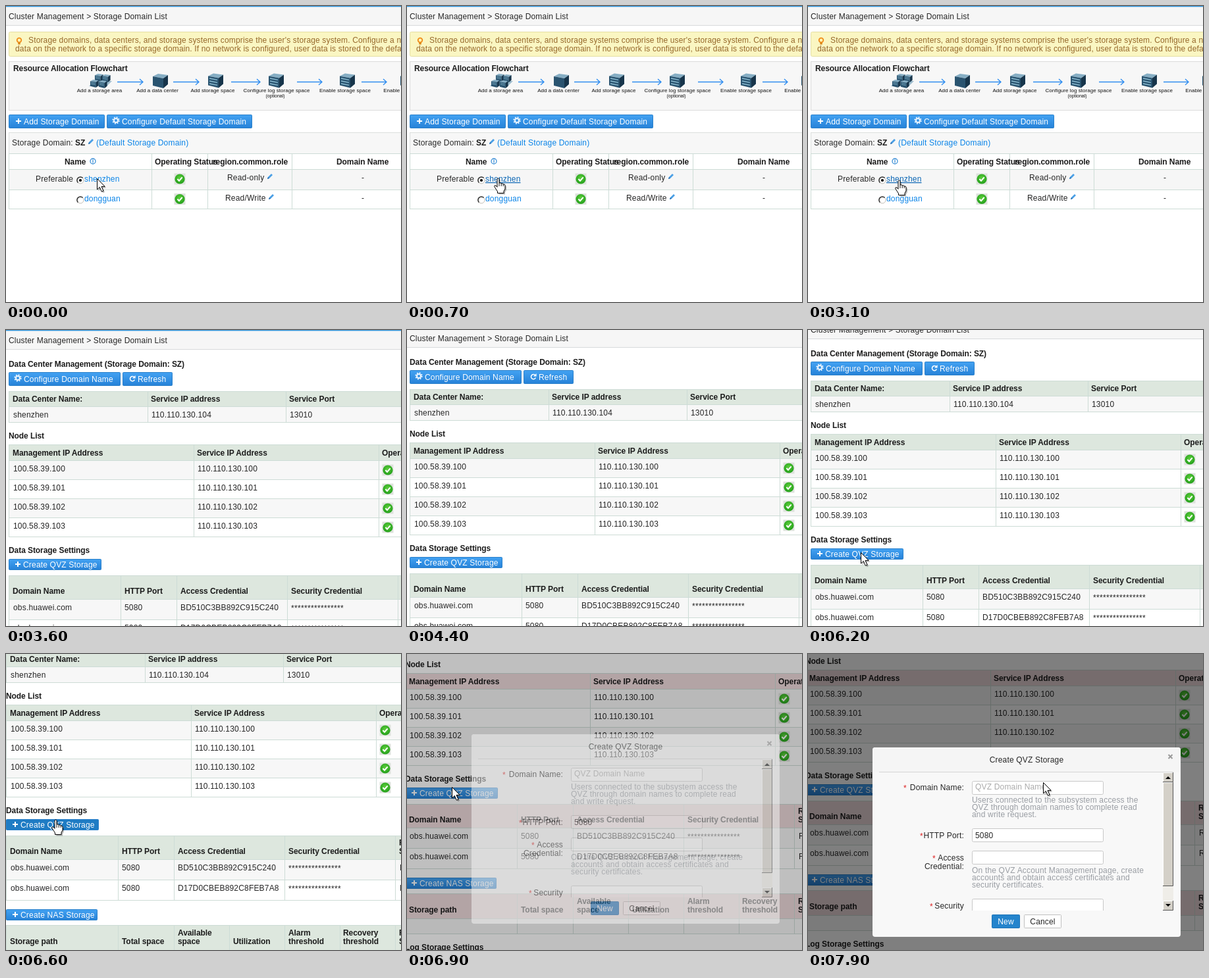
Animation, 600 px wide and 450 px high, one loop 8000 ms. Source, as an HTML page:

```html
<!DOCTYPE html>
<html lang="en">
<head>
<meta charset="utf-8">
<title>Storage domain walkthrough</title>
<style>
html, body { margin: 0; width: 100%; height: 100%; overflow: hidden; background: #fff; }
svg { display: block; width: 600px; height: 450px; }
text { font: 12px "Liberation Sans", Arial, sans-serif; letter-spacing: .18px; fill: #262626; white-space: pre; }
.b { font-weight: bold; letter-spacing: -.07px; fill: #1c1c1c; }
.w { fill: #fff; }
.link { fill: #0a84e8; }
.note { fill: #96682a; letter-spacing: .15px; }
.tiny { font-size: 8px; letter-spacing: .03px; text-anchor: middle; fill: #111; }
.mini { font-size: 7px; letter-spacing: 0; text-anchor: middle; fill: #111; }
.secret { letter-spacing: .33px; }
.r { text-anchor: end; }
.m { text-anchor: middle; }
.help { fill: #999da3; }
.hint { fill: #aaa; }
.star { fill: #d22; }
.head { fill: #dde7de; }
.dimmed .head { fill: #eedadc; }
.hover { fill: #0b66b5; text-decoration: underline; }
</style>
</head>
<body>
<svg id="stage" viewBox="0 0 600 450"></svg>
<script>
const LOOP = 8000, STEP = 100, RIGHT = 630;
const LINE = '#cddcd6';

const text = (x, y, s, cls = '', id = '') =>
  `<text x="${x}" y="${y}" class="${cls}"${id && ` id="${id}"`}>${s}</text>`;
const rect = (x, y, w, h, fill, more = '') =>
  `<rect x="${x}" y="${y}" width="${w}" height="${h}" fill="${fill}" ${more}/>`;
const path = (d, fill, more = '') => `<path d="${d}" fill="${fill}" ${more}/>`;
const at = (x, y, s) => `<g transform="translate(${x} ${y})">${s}</g>`;
const box = (x, y, w, h, fill, line, r = 0, id = '') =>
  rect(x + .5, y + .5, w - 1, h - 1, fill, `stroke="${line}" rx="${r}"${id && ` id="${id}"`}`);

const plus = (x, y) => path(`M${x - 4} ${y}h8M${x} ${y - 4}v8`, 'none', 'stroke="#fff" stroke-width="2"');
const gear = (x, y) =>
  `<circle cx="${x}" cy="${y}" r="3" fill="none" stroke="#e8f4ff" stroke-width="2"/>
   <circle cx="${x}" cy="${y}" r="4.7" fill="none" stroke="#e8f4ff" stroke-width="2" stroke-dasharray="1.85"/>`;
const reload = (x, y) =>
  path(`M${x + 3} ${y - 2}A3.6 3.6 0 1 0 ${x + 3.4} ${y + 1.5}`, 'none', 'stroke="#fff" stroke-width="1.6"') +
  path(`M${x + 4.6} ${y - 5}v4.6h-4.6z`, '#fff');
const pencil = (x, y) => at(x, y,
  path('M-4 4l1-3 5-5 2 2-5 5z', '#4a9fe6') + path('M-4 4l1-3 2 2z', '#2b6cab'));
const check = (x, y) => at(x, y,
  rect(-8.5, -8.5, 17, 17, '#dde2dc') + '<circle r="7.6" fill="url(#green)"/>' +
  path('M-3.6 0l2.6 2.7L3.7-2.6', 'none', 'stroke="#fff" stroke-width="2"'));
const radio = (x, y, on) =>
  `<circle cx="${x}" cy="${y}" r="5" fill="#fff" stroke="#c4c0b8"/>` +
  path(`M${x - 3.6} ${y + 3.6}A5 5 0 0 1 ${x + 3.6} ${y - 3.6}`, 'none', 'stroke="#333" stroke-width="1.5"') +
  (on ? `<circle cx="${x}" cy="${y}" r="2.1" fill="#000"/>` : '');
const button = (x, y, w, h, tx, ty, label, icon, id = '') =>
  box(x, y, w, h, 'url(#blue)', '#2a80ca', 1, id) + icon + text(tx, ty, label, 'w');

// rows holds the y of every rule: table top, header bottom, then each row bottom
function table(cols, rows) {
  const last = rows[rows.length - 1];
  let s = rect(4, rows[0], RIGHT, rows[1] - rows[0], 'none', 'class="head"');
  for (let i = 1; i < rows.length - 1; i++)
    s += rect(4, rows[i], RIGHT, rows[i + 1] - rows[i], i % 2 ? '#f7f7f7' : '#fff');
  const rules = rows.map(y => `M4 ${y + .5}h${RIGHT}`).join('');
  const bars = cols.map(x => `M${x + .5} ${rows[0]}V${last}`).join('');
  return s + path(rules + bars + `M4.5 ${rows[0]}V${last}`, 'none', `stroke="${LINE}"`);
}

const header = () =>
  rect(0, 0, RIGHT, 30, '#f6f6f6') + rect(0, 0, RIGHT, 1.3, '#2b93dc') +
  rect(0, 29, RIGHT, 1, '#d8dadc') + text(4, 20, 'Cluster Management &gt; Storage Domain List');

// an isometric cabinet with a bright lid and slots on its front
function cabinet(x, y, scale = 1, slots = 3) {
  let s = path('M-11-7L-3-11 12-9 5-4z', '#86aec4') +
    path('M-11-7L5-4V11L-11 7z', '#2a5470') + path('M5-4L12-9V5L5 11z', '#17354b');
  for (let i = 0; i < slots; i++)
    s += path(`M-9 ${i * 4 - 3.5}l12 2.4`, 'none', 'stroke="#8fc0d6" stroke-width="1.3"');
  return `<g transform="translate(${x} ${y}) scale(${scale})">${s}</g>`;
}
const cluster = (x, y) => at(x, y,
  path('M-17 8L-9 0H18L10 8z', '#9dbccd') +
  cabinet(-2, -5, .55, 2) + cabinet(9, -4, .55, 2) + cabinet(-9, 4, .55, 2) + cabinet(4, 5, .55, 2));

function flowchart() {
  const nodes = [[142, 'Add a storage area'], [230, 'Add a data center'], [314, 'Add storage space'],
    [411, 'Configure log storage space'], [515, 'Enable storage space'], [603, 'Enable a service']];
  const arrows = [[169, 208], [254, 293], [342, 386], [442, 480], [540, 578]];
  return cluster(143, 114) + cabinet(234, 114, 1, 0) +
    [318, 410, 518, 610].map(x => cabinet(x, 113.5)).join('') +
    nodes.map(([x, label]) => text(x, 131, label, 'tiny')).join('') +
    text(409, 139, '(optional)', 'mini') +
    arrows.map(([a, b]) => path(`M${a} 115.5H${b}M${b - 5} 111l5 4.5-5 4.5`, 'none',
      'stroke="#2f8df0" stroke-width="1.3"')).join('');
}

const listPage = () => header() +
  box(4, 39, RIGHT, 38, '#faf6c2', '#e5dfa4', 2) +
  '<circle cx="20" cy="52" r="3.3" fill="#fff3b0" stroke="#f08c1a" stroke-width="1.8"/>' +
  rect(18.3, 55.5, 3.4, 3, '#d98516') +
  text(34, 56, 'Storage domains, data centers, and storage systems comprise the user\'s storage system. Configure a network', 'note') +
  text(14, 69, 'data on the network to a specific storage domain. If no network is configured, user data is stored to the default', 'note') +
  box(4, 84, RIGHT, 75, '#f7f7f7', '#dcdcdc') +
  text(11, 99, 'Resource Allocation Flowchart', 'b') + flowchart() +
  button(4, 165, 146, 21, 27, 180, 'Add Storage Domain', plus(19, 175)) +
  button(153, 165, 221, 21, 176, 180, 'Configure Default Storage Domain', gear(167, 174)) +
  box(4, 192, RIGHT, 33, '#f7f7f7', '#dcdfdd') +
  text(9, 212, 'Storage Domain:') + text(105, 212, 'SZ', 'b') + pencil(129, 206) +
  text(137, 212, '(Default Storage Domain)', 'link') +
  rect(4, 225, RIGHT, 23, '#fff') + rect(4, 249, RIGHT, 30, '#f6f6f6') +
  path([224, 248, 279, 308].map(y => `M4 ${y + .5}h${RIGHT}`).join('') +
    [4, 221, 306, 434].map(x => `M${x + .5} 224V308`).join(''), 'none', `stroke="${LINE}"`) +
  text(89, 241, 'Name', 'b') + text(226, 241, 'Operating Status', 'b') +
  text(314, 241, 'region.common.role', 'b') + text(502, 241, 'Domain Name', 'b') +
  '<circle cx="132" cy="236" r="4" fill="none" stroke="#3b8fd6" stroke-width="1.3"/>' +
  rect(131.4, 233.5, 1.3, 5, '#3b8fd6') +
  text(45, 267, 'Preferable') + radio(113, 265, true) + text(119, 267, 'shenzhen', 'link', 'siteLink') +
  check(264, 263) + text(336, 265, 'Read-only') + pencil(401, 259) + text(540, 265, '-') +
  radio(113, 295) + text(119, 297, 'dongguan', 'link') +
  check(264, 293.5) + text(333, 296, 'Read/Write') + pencil(403, 290) + text(540, 296, '-');

function detailPage() {
  const row = (xs, y, cells, cls) => cells.map((c, i) => text(xs[i], y, c, cls)).join('');
  const nodes = [0, 1, 2, 3].map(i =>
    row([11, 291], 215 + 29 * i, [`100.58.39.10${i}`, `110.110.130.10${i}`]) + check(580, 213 + 29 * i)).join('');
  const stores = ['BD510C3BB892C915C240', 'D17D0CBEB892C8FEB7A8'].map((key, i) =>
    row([11, 180, 265, 602], 426 + 31 * i, ['obs.huawei.com', '5080', key, 'Read']) +
    text(433, 427 + 31 * i, '*'.repeat(16), 'secret')).join('');
  return header() +
    text(4, 56, 'Data Center Management (Storage Domain: SZ)', 'b') +
    button(4, 64, 170, 21, 27, 79, 'Configure Domain Name', gear(18, 73)) +
    button(177, 64, 76, 21, 200, 79, 'Refresh', reload(192, 74)) +
    table([215, 425], [93, 116, 140]) +
    row([10, 220, 430], 109, ['Data Center Name:', 'Service IP address', 'Service Port'], 'b') +
    row([11, 221, 431], 133, ['shenzhen', '110.110.130.104', '13010']) +
    text(4, 165, 'Node List', 'b') +
    table([285, 566], [174, 198, 227, 256, 285, 314]) +
    row([10, 290, 571], 191, ['Management IP Address', 'Service IP Address', 'Operating Status'], 'b') + nodes +
    text(4, 339, 'Data Storage Settings', 'b') +
    button(4, 348, 141, 17, 26, 361, 'Create QVZ Storage', plus(18, 356), 'create') +
    table([174, 259, 427, 595], [373, 409, 440, 471]) +
    row([10, 180, 265, 433, 601], 401,
      ['Domain Name', 'HTTP Port', 'Access Credential', 'Security Credential', 'Status'], 'b') +
    text(601, 388, 'Region', 'b') + stores +
    button(4, 485, 139, 17, 26, 498, 'Create NAS Storage', plus(18, 493)) +
    table([174, 259, 343, 427, 511, 595], [509, 547, 570]) +
    row([265, 433, 516, 601], 525, ['Available', 'Alarm', 'Recovery', 'Region'], 'b') +
    row([10, 180, 265, 349, 433, 516, 601], 538,
      ['Storage path', 'Total space', 'space', 'Utilization', 'threshold', 'threshold', 'Status'], 'b') +
    text(4, 595, 'Log Storage Settings', 'b');
}

function dialog() {
  const field = y => box(249, y, 200, 21, '#fff', '#c8c8c8', 2);
  const label = (y, s, starX) => text(237, y, s, 'r') + (starX ? text(starX, y + 1, '*', 'star') : '');
  const help = (y, lines) => lines.map((s, i) => text(249, y + 11 * i, s, 'help')).join('');
  const knob = (y, h, d) => rect(539, y, 16, h, '#d4d0c8') +
    path(`M539.5 ${y + h}V${y + .5}H555`, 'none', 'stroke="#fff"') +
    path(`M539 ${y + h - .5}H554.5V${y}`, 'none', 'stroke="#555"') + (d ? path(d, '#000') : '');
  return rect(98, 142, 468, 288, '#f8f8f8', 'rx="4"') +
    path('M98 180V146a4 4 0 0 1 4-4H562a4 4 0 0 1 4 4V180z', '#f5f5f5') +
    rect(108, 179, 447, 1, '#d5d5d5') +
    text(332, 165, 'Create QVZ Storage', 'm') +
    path('M547.5 153l6 6m0-6l-6 6', 'none', 'stroke="#999" stroke-width="2"') +
    '<g clip-path="url(#form)">' +
    field(193) + text(254, 206, 'QVZ Domain Name', 'hint') + label(207, 'Domain Name:', 145) +
    help(226, ['Users connected to the subsystem access the',
      'QVZ through domain names to complete read', 'and write request.']) +
    field(265) + text(254, 280, '5080') + label(280, 'HTTP Port:', 170) +
    field(299) + label(314, 'Access', 189) + label(327, 'Credential:') +
    help(333, ['On the QVZ Account Management page, create',
      'accounts and obtain access certificates and', 'security certificates.']) +
    field(372) + label(387, 'Security', 185) + '</g>' +
    rect(539, 180, 16, 210, '#efede8') +
    knob(180, 15, 'M543 190h8l-4-4z') + knob(195, 158) + knob(375, 15, 'M543 380h8l-4 4z') +
    box(279, 396, 43, 21, '#2484cc', '#1c74b8', 1) + text(300.5, 411, 'New', 'm w') +
    box(328, 396, 57, 21, '#fff', '#c0c0c0', 1) + text(356.5, 411, 'Cancel', 'm');
}

const arrowPath = 'M.5 .5V17L4.3 13.4 7.3 20.3 10 19.1 7 12.4H12.2z';
const handPath = 'M-2 1.5Q-2 0 -.5 0T1 1.5V7Q3.5 6 4.2 8 6.6 7 7.2 9 9.8 8.3 10 11V16L8 19.5V22.5H-1.5V20L-6.3 12.5Q-6.4 10 -4 11L-2 13.3z';
const cursor = (id, d, extra = '') => `<g id="${id}">` +
  path(d, '#000', 'opacity=".28" transform="translate(2 2)"') +
  path(d, '#fff', 'stroke="#000" stroke-linejoin="round"') + extra + '</g>';
const handLines = path('M1 7v5M4.2 8v4M7.2 9v3', 'none', 'stroke="#000" stroke-width=".9"');
const glass = `<g id="glass">${path('M14 13h9v2l-3.5 5 3.5 5v2h-9v-2l3.5-5-3.5-5z', '#fff', 'stroke="#000"')}${
  path('M16 25l2.5-3 2.5 3z', '#555')}</g>`;

document.getElementById('stage').innerHTML = `
  <defs>
    <linearGradient id="blue" x2="0" y2="1"><stop stop-color="#43a2f2"/><stop offset="1" stop-color="#2682d8"/></linearGradient>
    <radialGradient id="green" cy=".4"><stop stop-color="#5fd03c"/><stop offset="1" stop-color="#2aa51f"/></radialGradient>
    <clipPath id="form"><rect x="98" y="180" width="441" height="210"/></clipPath>
  </defs>
  ${rect(0, 0, 600, 450, '#fff')}
  <g id="list">${listPage()}</g><g id="detail">${detailPage()}</g>
  <rect id="shade" width="600" height="450"/><g id="dialog">${dialog()}</g>
  ${cursor('arrow', arrowPath, glass)}${cursor('hand', handPath, handLines)}`;

const part = Object.fromEntries(
  ['list', 'detail', 'shade', 'dialog', 'arrow', 'hand', 'glass', 'siteLink', 'create']
    .map(id => [id, document.getElementById(id)]));

// [time, x, y]
const pan = [[4100, 0, 0], [4800, 0, -8], [5800, 0, -8], [6200, 0, -16], [6600, -4, -97],
  [6700, -5, -117], [6800, -6, -134], [6900, -7, -145], [7000, -8, -150]];
const fade = [[6700, 0, -40], [7100, 1, 0]];
// [time, shape, x, y]
const pointer = [[0, 'arrow', 138, 262], [700, 'hand', 139, 262], [3100, 'hand', 139, 265],
  [3200, 'hand', 140, 269], [3300, 'arrow', 141, 274], [3500, ''],
  [6000, 'arrow', 150, 400], [6100, 'arrow', 100, 355], [6200, 'arrow', 80, 338],
  [6300, 'hand', 79, 316], [6400, 'hand', 78, 295], [6500, 'hand', 77, 273], [6600, 'hand', 76, 252],
  [6700, 'hand', 75, 232], [6800, 'arrow', 71, 214], [6900, 'arrow', 68, 202], [7000, 'arrow', 65, 195],
  [7800, 'arrow', 230, 198], [7900, 'arrow', 357, 195]];

function glide(keys, t) {
  const i = keys.findIndex(k => k[0] > t);
  if (i === 0) return keys[0].slice(1);
  if (i < 0) return keys[keys.length - 1].slice(1);
  const a = keys[i - 1], b = keys[i], p = (t - a[0]) / (b[0] - a[0]);
  return [1, 2].map(k => a[k] + (b[k] - a[k]) * p);
}
const show = (el, on) => el.setAttribute('display', on ? 'inline' : 'none');
const move = (el, x, y) => el.setAttribute('transform', `translate(${Math.round(x)} ${Math.round(y)})`);

function draw(now) {
  const t = Math.floor(now % LOOP / STEP) * STEP;
  show(part.list, t < 3500);
  show(part.detail, t >= 3500);
  move(part.detail, ...glide(pan, t));

  const [alpha, drop] = glide(fade, t);
  part.shade.setAttribute('opacity', alpha * .5);
  part.dialog.setAttribute('opacity', alpha);
  move(part.dialog, 0, drop);
  part.detail.setAttribute('class', alpha > 0 ? 'dimmed' : '');

  const [, shape, x, y] = pointer.filter(k => k[0] <= t).pop();
  for (const name of ['arrow', 'hand']) {
    show(part[name], shape === name);
    if (shape === name) move(part[name], x, y);
  }
  show(part.glass, t >= 7300 && t < 7800);
  part.siteLink.setAttribute('class', t >= 700 && t < 3300 ? 'hover' : 'link');
  part.create.setAttribute('fill', t >= 6300 && t < 6800 ? '#1f7cc4' : 'url(#blue)');
}

const start = performance.now();
(function tick() {
  draw(performance.now() - start);
  requestAnimationFrame(tick);
})();
</script>
</body>
</html>
```
